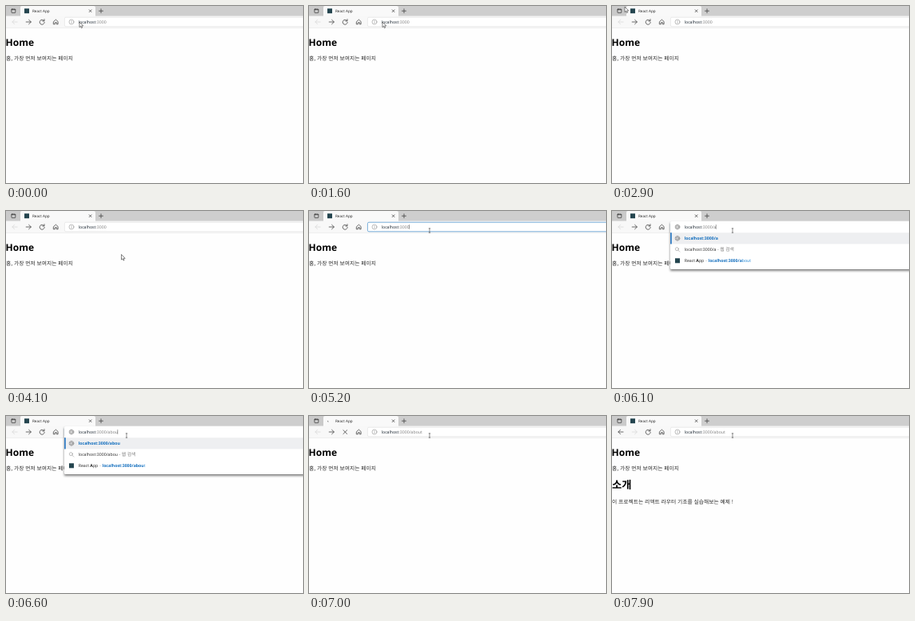
These frames come from a looping animation (372x222 px, 8 s). An HTML page:

```html
<!DOCTYPE html>
<html lang="ko">
<head>
<meta charset="utf-8">
<title>React App</title>
<style>
  html, body { margin: 0; width: 100%; height: 100%; overflow: hidden; background: #fefefe; }
  svg { display: block; width: 372px; height: 222px; }
  text { font: 5.2px "Open Sans", "Noto Sans CJK KR", "Noto Sans CJK", sans-serif; text-rendering: geometricPrecision; fill: #222; white-space: pre; }
  .tab { font-size: 4.6px; }
  .ko { font-family: "Noto Sans CJK KR", "Noto Sans CJK", sans-serif; font-size: 6.75px; fill: #2a2a2a; }
  .h1 { font-size: 12px; font-weight: 700; fill: #000; }
  .h1.ko { font-size: 13.3px; }
  .dim { fill: #7c7c7c; }
  .find { font-size: 5.8px; }
  .host { fill: #14202b; }
  .hit { fill: #0f6cbd; font-weight: 700; }
  .link { fill: #1780d2; }
  .b { font-weight: 700; }
  .line { fill: none; stroke: #3a3a3a; stroke-width: .75; stroke-linecap: round; stroke-linejoin: round; }
  .off { stroke: #d6d6d6; }
  .thin { stroke: #7c7c7c; stroke-width: .5; }
</style>
</head>
<body>
<svg viewBox="0 0 372 222">
  <defs>
    <g id="globe" class="line thin">
      <circle r="2.9"/><ellipse rx="1.3" ry="2.9"/><path d="M-2.7-1H2.7M-2.7 1H2.7"/>
    </g>
    <g id="lens" class="line thin"><circle cx="-.6" cy="-.6" r="2"/><path d="M.9.9 2.8 2.8"/></g>
    <rect id="mark" x="-3" y="-3" width="6" height="6" fill="#24454f"/>
    <filter id="blur" x="-10%" y="-30%" width="120%" height="160%"><feGaussianBlur stdDeviation="1.5"/></filter>
  </defs>

  <rect width="372" height="222" fill="#fefefe"/>
  <text class="h1" x="-.4" y="50">Home</text>
  <text class="ko" x="0" y="68.3">홈, 가장 먼저 보여지는 페이지</text>
  <g id="about">
    <text class="ko h1" x="0" y="91.4">소개</text>
    <text class="ko" x="0" y="110">이 프로젝트는 리액트 라우터 기초를 실습해보는 예제 !</text>
  </g>

  <!-- tab strip -->
  <rect width="372" height="13" fill="#cecece"/>
  <rect width="18" height="12.5" fill="#cacaca"/>
  <g class="line" stroke-width=".7"><rect x="6.9" y="3.9" width="4.9" height="4.7" rx=".7"/><path d="M7 4.6H11.7"/></g>
  <path d="M18 13V2Q18 0 20 0H110Q112 0 112 2V13Z" fill="#f9f9f9"/>
  <use id="icon" href="#mark" x="26" y="6.2"/>
  <path id="spin" class="line" d="M-2.2.9A2.4 2.4 0 0 1-2.4.1"/>
  <text class="tab" x="33" y="8">React App</text>
  <path class="line" d="M104.2 4.8 107 7.6M107 4.8 104.2 7.6"/>
  <path class="line" d="M116.5 6.2H121.5M119 3.7V8.7"/>

  <!-- toolbar -->
  <rect y="12.5" width="372" height="14.8" fill="#f8f8f8"/>
  <path d="M0 27.4H372" stroke="#e5e5e5" stroke-width=".6"/>
  <path id="back" class="line" d="M14 20H8M10.5 17.3 7.8 20 10.5 22.7"/>
  <path id="next" class="line" d="M25.2 20H31.2M28.6 17.3 31.4 20 28.6 22.7"/>
  <path id="reload" class="line" d="M47.7 18.6A3 3 0 1 0 48.2 20.4M48 16.6V18.9H45.7"/>
  <path id="stop" class="line" d="M42.9 17.7 47.7 22.5M47.7 17.7 42.9 22.5"/>
  <path class="line" d="M59.7 19.5 62.4 17.1 65.1 19.5V22.8H63.4V20.7H61.4V22.8H59.7Z"/>
  <rect id="bar" x="73.4" y="14.2" width="310" height="11.6" rx="1.6" fill="#fff"/>

  <!-- suggestions -->
  <g id="panel">
    <rect id="shade" x="73" y="15" width="310" fill="#000" opacity=".5" filter="url(#blur)"/>
    <rect id="sheet" x="73" y="13" width="310" rx="1.5" fill="#fff"/>
    <rect x="73" y="27.2" width="310" height="14.2" fill="#eeeff1"/>
    <rect x="73" y="27.2" width="1.9" height="14.2" fill="#3f85c8"/>
    <use href="#globe" x="82" y="34.3"/>
    <text class="hit" id="pick" x="90.7" y="36.2"></text>
    <use href="#lens" x="82" y="48.3"/>
    <text x="90.7" y="50.2"><tspan id="query"></tspan><tspan class="dim find"> - 웹 검색</tspan></text>
    <g id="rows"></g>
  </g>

  <g id="info" class="line thin"><circle cx="82" cy="20" r="3"/><path d="M82 19.6V21.5M82 18.4V18.5"/></g>
  <use id="site" href="#globe" x="82" y="20"/>
  <text x="90.7" y="21.9" id="url"><tspan class="host">localhost</tspan><tspan class="dim" id="tail"></tspan></text>
  <path id="caret" d="M0 17V22.8" stroke="#444" stroke-width=".5"/>

  <path id="arrow" d="M0 0V6.6L1.5 5.3 2.5 7.6 3.6 7.1 2.6 4.9H4.7Z" fill="#fff" stroke="#333" stroke-width=".6" stroke-linejoin="round"/>
  <path id="beam" class="line" d="M-.8-2.6H.8M0-2.6V2.6M-.8 2.6H.8" style="stroke-width: .55"/>
</svg>
<script>
const LOOP = 8000, STEP = 100;
const $ = id => document.getElementById(id);
const show = (id, on) => { $(id).style.display = on ? "" : "none"; };
const set = (id, attrs) => { for (const k in attrs) $(id).setAttribute(k, attrs[k]); };

// time, x, y of the pointer
const PATH = [
  [0, 92, 20], [2300, 92, 20], [2500, 82, 14], [2700, 40, 5], [2900, 16, 1],
  [3000, 30, 24], [3200, 100, 92], [3400, 150, 110], [3600, 186, 115],
  [3900, 152, 66], [4100, 144.5, 54.5], [4400, 146, 46], [4700, 151, 24.5]
];
// time, text after the port
const TYPED = [[0, ""], [5700, "/"], [6000, "/a"], [6300, "/ab"], [6500, "/abo"], [6600, "/abou"], [6700, "/about"]];
const FOCUS = 4700, OPEN = 5700, ENTER = 6800, DONE = 7500;

function pointer(t) {
  const i = PATH.findIndex(p => p[0] > t);
  if (i < 0) return PATH[PATH.length - 1].slice(1);
  const [t0, x0, y0] = PATH[i - 1], [t1, x1, y1] = PATH[i];
  const k = (t - t0) / (t1 - t0);
  return [x0 + (x1 - x0) * k, y0 + (y1 - y0) * k];
}

function pageRow(y, typed, rest) {
  return `<use href="#mark" x="82" y="${y}"/><text x="90.7" y="${y + 1.9}">React ` +
    `<tspan class="${typed.length > 1 ? "b" : ""}">A</tspan>pp<tspan class="dim" dx=".5"> - </tspan>` +
    `<tspan class="hit" dx=".4">localhost:3000${typed}</tspan><tspan class="link">${rest}</tspan></text>`;
}

function panel(typed) {
  const pages = typed === "/" ? ["/", "/about"] : ["/about"];
  const height = 46 + pages.length * 14;
  set("sheet", { height });
  set("shade", { height });
  $("pick").textContent = $("query").textContent = "localhost:3000" + typed;
  $("rows").innerHTML = pages.map((p, i) => pageRow(62.3 + 14 * i, typed, p.slice(typed.length))).join("");
}

function draw(t) {
  const typed = TYPED.filter(s => s[0] <= t).pop()[1];
  const focus = t >= FOCUS && t < ENTER;
  const open = t >= OPEN && t < ENTER;
  const loading = t >= ENTER && t < DONE;
  const done = t >= DONE;

  $("tail").textContent = ":3000" + typed;
  show("panel", open);
  if (open) panel(typed);
  show("info", !open);
  show("site", open);
  set("bar", { stroke: focus ? "#6ba6d6" : "#dedede", "stroke-width": focus ? .9 : .6 });

  show("caret", focus && !(t >= 5000 && t < 5200));
  set("caret", { transform: `translate(${90.5 + $("url").getComputedTextLength()} 0)` });

  show("icon", !loading);
  show("spin", loading);
  set("spin", { transform: `translate(26 6.2) rotate(${(t - 7000) * .5})` });
  show("reload", !loading);
  show("stop", loading);
  $("back").classList.toggle("off", !done);
  $("next").classList.toggle("off", done);
  show("about", done);

  const at = `translate(${pointer(t).join(" ")})`;
  const beam = t >= 4600;
  show("arrow", !beam);
  show("beam", beam);
  set(beam ? "beam" : "arrow", { transform: at });
}

const start = performance.now();
let last = -1;
function tick() {
  const t = Math.floor((performance.now() - start) % LOOP / STEP) * STEP;
  if (t !== last) draw(last = t);
  requestAnimationFrame(tick);
}
tick();
</script>
</body>
</html>
```
